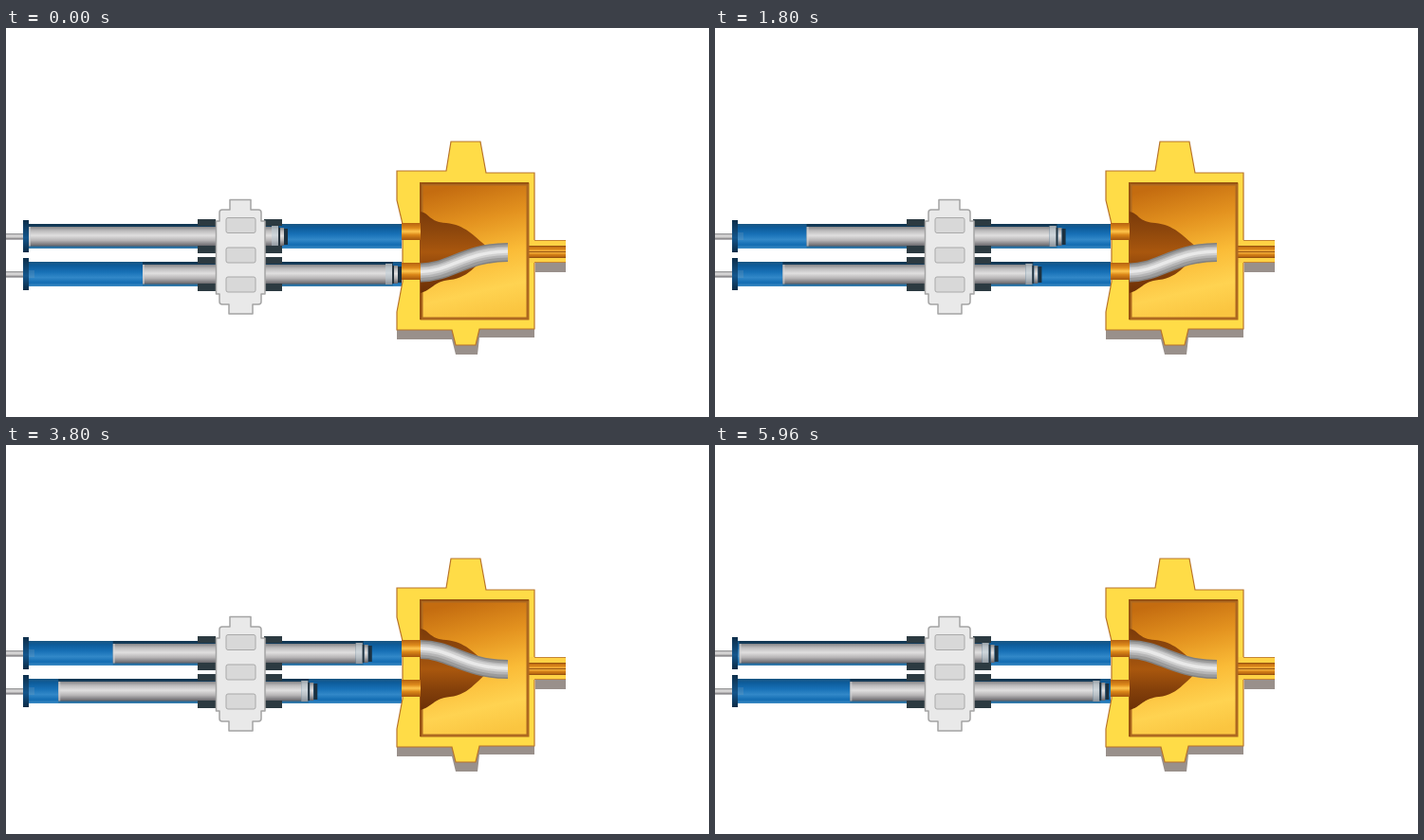
Write an HTML page that moves like this. It is 741 by 411 pixels and loops after 6000 ms.

```html
<!DOCTYPE html>
<html lang="en">
<head>
<meta charset="utf-8">
<title>Twin piston pump</title>
<style>
  html, body { margin: 0; width: 100%; height: 100%; overflow: hidden; background: #fff; }
  svg { display: block; width: 741px; height: 411px; }
</style>
</head>
<body>
<svg viewBox="0 0 741 411" xmlns="http://www.w3.org/2000/svg">
  <defs>
    <linearGradient id="fluid" x2="0" y2="1">
      <stop offset="0" stop-color="#195581"/>
      <stop offset=".16" stop-color="#0d5c9b"/>
      <stop offset=".42" stop-color="#1871b7"/>
      <stop offset=".64" stop-color="#3288c8"/>
      <stop offset=".85" stop-color="#126cb2"/>
      <stop offset="1" stop-color="#3d8bc4"/>
    </linearGradient>
    <linearGradient id="bore" x2="0" y2="1">
      <stop offset="0" stop-color="#103550"/>
      <stop offset=".15" stop-color="#173f5e"/>
      <stop offset=".85" stop-color="#125484"/>
      <stop offset="1" stop-color="#3a82b3"/>
    </linearGradient>
    <linearGradient id="steel" x2="0" y2="1">
      <stop offset="0" stop-color="#858587"/>
      <stop offset=".2" stop-color="#bcbbbc"/>
      <stop offset=".45" stop-color="#e0dfdf"/>
      <stop offset=".7" stop-color="#b7b5b6"/>
      <stop offset="1" stop-color="#636267"/>
    </linearGradient>
    <linearGradient id="flange" x2="0" y2="1">
      <stop offset="0" stop-color="#0d2e4a"/>
      <stop offset=".55" stop-color="#14568c"/>
      <stop offset="1" stop-color="#0c2b46"/>
    </linearGradient>
    <linearGradient id="copper" x2="0" y2="1">
      <stop offset="0" stop-color="#b4610f"/>
      <stop offset=".3" stop-color="#de8a1c"/>
      <stop offset=".5" stop-color="#ffc64d"/>
      <stop offset=".7" stop-color="#da8618"/>
      <stop offset="1" stop-color="#a4560d"/>
    </linearGradient>
    <linearGradient id="chamber" x1=".4" x2=".58" y2="1">
      <stop offset="0" stop-color="#c46c10"/>
      <stop offset=".28" stop-color="#e3921f"/>
      <stop offset=".55" stop-color="#fabb37"/>
      <stop offset=".8" stop-color="#ffd351"/>
      <stop offset="1" stop-color="#fac540"/>
    </linearGradient>
    <linearGradient id="bell" x2="0" y2="1">
      <stop offset="0" stop-color="#7a3a0a"/>
      <stop offset=".22" stop-color="#8c460c"/>
      <stop offset=".5" stop-color="#a9570e"/>
      <stop offset=".75" stop-color="#84400a"/>
      <stop offset="1" stop-color="#6b2f06"/>
    </linearGradient>
  </defs>

  <g id="cylinders"></g>

  <g id="clamp" stroke-linejoin="round">
    <path d="M236 181.500H258V192H266Q269 192 269 195V204H273V281H269V289Q269 292 266 292H260V302H235V292H228Q225 292 225 289V281H221.500V204H225V195Q225 192 228 192H236Z"
      fill="#e9e9e9" stroke="#a4a4a4" stroke-width="1.500"/>
  </g>

  <g id="mixer">
    <path d="M412 310V329H470L474 345H497L499 327H557V310ZM558 248H590V258H558Z" fill="#99908b"/>
    <path d="M412 151H464L469 120H500L506 153H557V318H499L495 335H474L470 319H412V300L418 268V207L412 182Z"
      fill="#ffdc47" stroke="#b8742a" stroke-width="1.200"/>
    <rect x="550" y="224" width="40" height="24" fill="#ffd245"/>
    <path d="M557 224.500H590M557 247.500H590" stroke="#c58534"/>
    <rect x="550" y="230" width="40" height="13" fill="url(#copper)"/>
    <path d="M550 230.500H590M550 236.500H590M550 242.500H590" stroke="#985310"/>
    <rect x="438" y="165" width="112" height="142" fill="url(#chamber)" stroke="#ad6820" stroke-width="3"/>
    <path d="M437 308V164H551" fill="none" stroke="#985311" stroke-width="2"/>
    <path d="M437 194C447 196 446 205 464 206C484 208 492 219 507 231V241C493 253 486 264 468 266C450 268 449 277 437 280Z" fill="url(#bell)"/>
    <rect x="417" y="206" width="20" height="18" fill="url(#copper)"/>
    <rect x="417" y="248" width="20" height="18" fill="url(#copper)"/>
    <g id="pipe" fill="none"></g>
  </g>
</svg>
<script>
const PERIOD = 6000, STEP = 40, STROKE = 121;
const SVG_NS = 'http://www.w3.org/2000/svg';
const byId = id => document.getElementById(id);

function add(parent, tag, attrs) {
  const node = document.createElementNS(SVG_NS, tag);
  for (const key in attrs) node.setAttribute(key, attrs[key]);
  return parent.appendChild(node);
}

function bar(parent, x, y, width, height, fill, extra) {
  return add(parent, 'rect', { x, y, width, height, fill, ...extra });
}

// Returns the moving piston of a cylinder whose top edge is at y.
function buildCylinder(y) {
  const group = add(byId('cylinders'), 'g', {});
  bar(group, 0, y + 10, 20, 6.5, 'url(#steel)');
  bar(group, 19, y, 398, 26, 'url(#fluid)');
  bar(group, 23, y + 9, 7, 8, '#8fa5b5', { opacity: .2 });

  const piston = add(group, 'g', {});
  bar(piston, 0, y, 264, 26, 'url(#bore)');
  bar(piston, 0, y + 3, 256, 20.5, 'url(#steel)');
  bar(piston, 0, y + 3, 2, 20.5, '#d6d6d8', { opacity: .6 });
  bar(piston, 256, y + 2, 7, 22, 'url(#steel)');
  bar(piston, 256, y + 2, 7, 22, '#b9c9d6', { opacity: .45 });
  bar(piston, 263, y + 4, 2, 19, '#24323c');
  bar(piston, 265, y + 4, 4, 19, 'url(#steel)');
  bar(piston, 269, y + 5, 4, 17, '#1b303f');

  bar(group, 18, y - 4, 6, 34, 'url(#flange)');
  for (const x of [202, 272]) {
    bar(group, x, y - 5, 19, 7, '#2c3a41');
    bar(group, x, y + 23, 19, 8, '#2c3a41');
  }
  return piston;
}

function buildPipe() {
  const layers = [
    ['#808080', 20, 0], ['#9b9b9b', 17, 0], ['#b5b5b6', 12, -.5],
    ['#d0d0d0', 8, -1], ['#e9e9e9', 3.5, -1]
  ];
  return layers.map(([stroke, width, dy]) => add(byId('pipe'), 'path', {
    stroke, 'stroke-width': width, transform: `translate(0 ${dy})`
  }));
}

const upper = buildCylinder(207);
const lower = buildCylinder(247);
const pipeLayers = buildPipe();
for (const y of [200.5, 232, 263]) {
  bar(byId('clamp'), 232, y, 31, 16, '#d8d8d8', { rx: 2, stroke: '#a9a9a9' });
}

function draw(time) {
  const t = Math.floor(time % PERIOD / STEP) * STEP;
  const half = PERIOD / 2;
  const travel = STROKE * (1 - Math.abs(t - half) / half);
  upper.setAttribute('transform', `translate(${24 + travel} 0)`);
  lower.setAttribute('transform', `translate(${144 - travel} 0)`);
  const inlet = t < half ? 258.5 : 216;
  const curve = `M437 ${inlet}C468 ${inlet} 484 237 529 237`;
  for (const layer of pipeLayers) layer.setAttribute('d', curve);
}

const start = performance.now();
function tick() {
  draw(performance.now() - start);
  requestAnimationFrame(tick);
}
tick();
</script>
</body>
</html>
```
